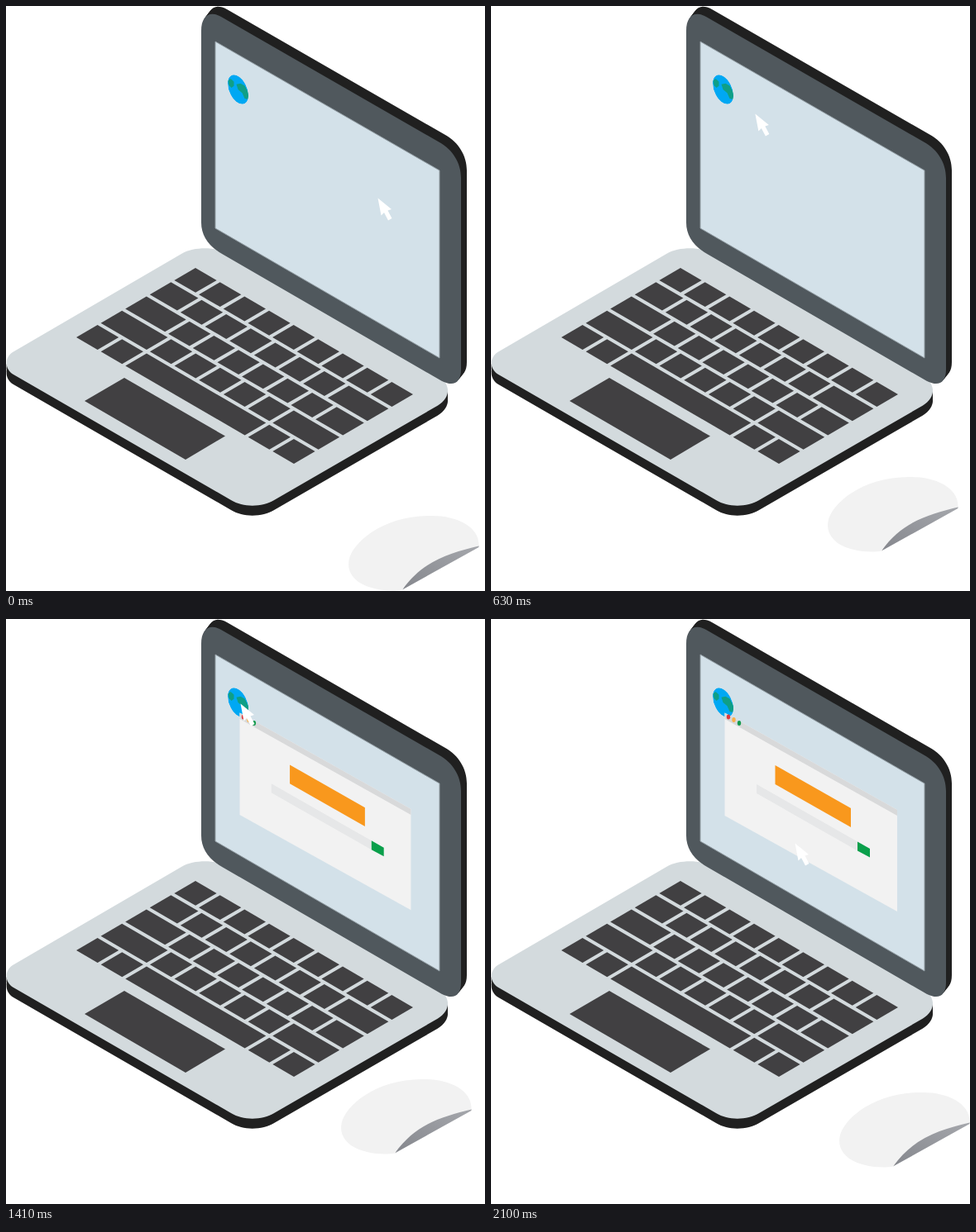
Write an HTML page that moves like this. It is 579x708 px and loops after 2.73 s.

```html
<!DOCTYPE html>
<html lang="en">
<head>
<meta charset="utf-8">
<title>Laptop and mouse</title>
<style>
  html, body { margin: 0; width: 100%; height: 100%; overflow: hidden; background: #fff; }
  svg { display: block; width: 579px; height: 708px; }
</style>
</head>
<body>
<svg viewBox="0 0 579 708">
  <defs>
    <path id="deck" d="M8 419L212 300C226 292 246 292 260 296L525 449C538 460 537 474 522 483.500L325 597.500C309 607 287 607 272 598L9 446C-2 439 -2 426 8 419Z"/>
    <path id="lid" d="M236 30C236 12 246 5 260 13L524 165C540 174 550 190 550 208L550 440C550 456 541 461 527 454L262 300.500C245 291 236 278 236 262Z"/>
    <linearGradient id="shade" x1="0" y1="1" x2="1" y2="0">
      <stop offset="0" stop-color="#85878d"/>
      <stop offset="1" stop-color="#a5a7ac"/>
    </linearGradient>
    <clipPath id="disc"><circle r="12.5"/></clipPath>
  </defs>

  <!-- base -->
  <g fill="#202020">
    <use href="#deck" y="4"/><use href="#deck" y="8"/><use href="#deck" y="12"/>
  </g>
  <use href="#deck" fill="#d3dadd"/>
  <g id="keys" fill="#414042" transform="matrix(1 .5817 -1 .5833 229 317)"/>
  <path fill="#414042" d="M143 450L265 520.500L217 549L95 478Z"/>

  <!-- lid -->
  <g fill="#202020">
    <use href="#lid" x="1.750" y="-2.250"/><use href="#lid" x="3.500" y="-4.500"/>
    <use href="#lid" x="5.250" y="-6.750"/><use href="#lid" x="7" y="-9"/>
  </g>
  <use href="#lid" fill="#50585d"/>
  <path fill="#d3e1e9" stroke="#929da3" d="M253 43L524 199V426L253 269Z"/>

  <g transform="matrix(1 .577 0 1.3 280.500 101)">
    <g clip-path="url(#disc)">
      <circle r="12.5" fill="#00a8f3"/>
      <g fill="#0f9f86">
        <path d="M-12 -3L-9 -6L-5 -5L-5 -1L-8 2L-11 1Z"/>
        <path d="M-2 -4L3 -7L8 -7L13 -2L12 4L8 5L5 1L0 0Z"/>
      </g>
    </g>
  </g>

  <g id="win">
    <path fill="#f2f2f2" d="M282.500 113.500L491 231V354L282.500 238Z"/>
    <path fill="#d8d9da" d="M282.500 113.500L491 231V238L282.500 121Z"/>
    <ellipse cx="287" cy="118.500" rx="2.200" ry="3" fill="#e0393e"/>
    <ellipse cx="293.500" cy="122" rx="2.200" ry="3" fill="#f9b04a"/>
    <ellipse cx="300" cy="126" rx="2.200" ry="3" fill="#129b4c"/>
    <path fill="#f9981d" d="M343.500 177L435 229V252L343.500 200Z"/>
    <path fill="#e6e7e8" d="M321 200L443 269.500V280.500L321 211Z"/>
    <path fill="#0a9f4b" d="M443 269.500L458 278V288.500L443 280.500Z"/>
  </g>

  <path id="cursor" fill="#fff" d="M0 0L16.500 13.500L12 15L17 24.500L12.500 27L7.500 17.500L4 21Z"/>

  <g id="mouse">
    <path fill="url(#shade)" d="M479 706.500C500 668 540 656 571.500 653V655Z"/>
    <path fill="#f2f2f2" d="M414.500 671C418 650 455 617 512 617C544 616 573 630 571.500 653.500C538 662 505 670 479 706.500C466 709 440 707 426 697C416 689 413 681 414.500 671Z"/>
  </g>
</svg>
<script>
  const LOOP = 2730, STEP = 30;
  const $ = id => document.getElementById(id);
  const NS = 'http://www.w3.org/2000/svg';

  // Keyboard on a grid of 9 units by 5 rows; key widths are in units.
  const UNIT = 267 / 9, ROW = 29.6, GAP = 4;
  const mixed = (first, singles) =>
    [first, ...Array(singles).fill(1), 9 - first - singles];
  const ROWS = [mixed(1, 7), mixed(1.25, 6), mixed(1.75, 6), mixed(2, 5), [1, 1, 5, 1, 1]];

  ROWS.forEach((widths, row) => {
    let x = 0;
    for (const w of widths) {
      const key = document.createElementNS(NS, 'rect');
      key.setAttribute('x', x * UNIT);
      key.setAttribute('y', row * ROW);
      key.setAttribute('width', w * UNIT - GAP);
      key.setAttribute('height', ROW - GAP);
      $('keys').append(key);
      x += w;
    }
  });

  // Motion
  const unit = (t, from, to) => Math.min(1, Math.max(0, (t - from) / (to - from)));
  const smooth = u => u * u * (3 - 2 * u);
  const outQuart = u => 1 - (1 - u) ** 4;
  const move = (id, x, y) => $(id).setAttribute('transform', `translate(${x} ${y})`);

  function draw(t) {
    const a = smooth(unit(t, 0, 900));
    const b = smooth(unit(t, 1500, 2100));
    move('cursor', 449.5 - 166 * a + 84 * b, 232.5 - 130 * a + 169 * b);
    move('mouse', -9 * a + 16 * b, -60 * a + 16 * b);

    const s = outQuart(unit(t, 930, 1610));
    $('win').style.display = s > 0 ? '' : 'none';
    $('win').setAttribute('transform', `translate(286 113) scale(${s}) translate(-286 -113)`);
  }

  const start = performance.now();
  function tick() {
    const t = (performance.now() - start) % LOOP;
    draw(Math.floor(t / STEP) * STEP);
    requestAnimationFrame(tick);
  }
  tick();
</script>
</body>
</html>
```
